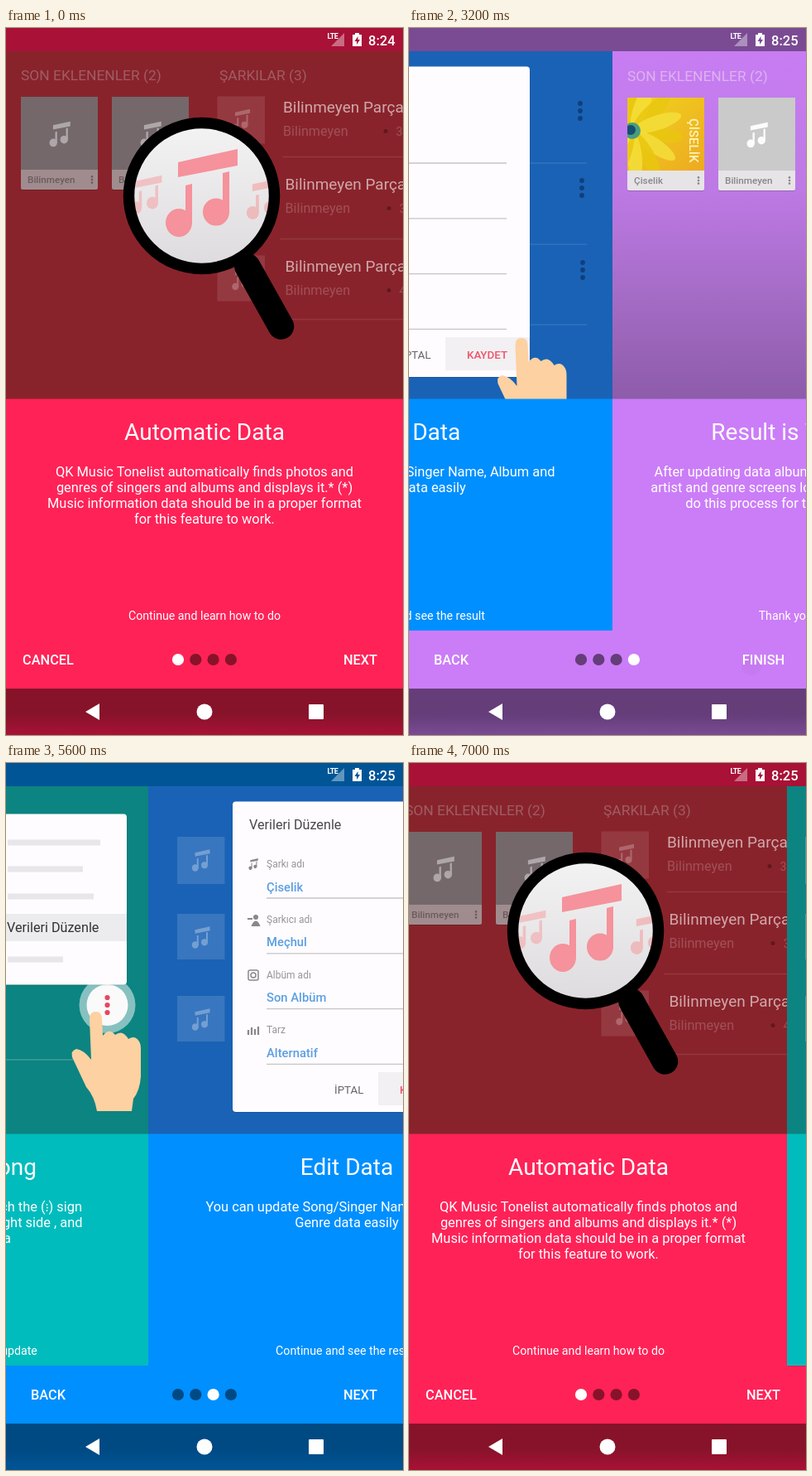
An HTML page for the animation above (7100 ms loop, 480 by 853 pixels).

```html
<!DOCTYPE html>
<html lang="en">
<head>
<meta charset="utf-8">
<title>Music app introduction</title>
<style>
html, body { margin: 0; width: 100%; height: 100%; overflow: hidden; background: #a91137; }
svg { display: block; }
text { font-family: Roboto, sans-serif; white-space: pre; }
</style>
</head>
<body>
<svg id="stage" width="100%" height="100%" viewBox="0 0 480 853"></svg>
<script>
const LOOP = 7100, STEP = 100, W = 480;

const themes = [
  { body: '#ff2257', image: '#89232b', status: '#a91137', nav: '#87132a' },
  { body: '#00bcbd', image: '#0c8481', status: '#006f6e', nav: '#005b5b' },
  { body: '#008fff', image: '#1a62b5', status: '#005597', nav: '#004a84' },
  { body: '#cb7df7', image: 'url(#dusk)', status: '#7a4b93', nav: '#643d79' }
];

// Drawing helpers
const rect = (x, y, w, h, fill, more = '') =>
  `<rect x="${x}" y="${y}" width="${w}" height="${h}" fill="${fill}" ${more}/>`;
const disc = (x, y, r, fill, more = '') =>
  `<circle cx="${x}" cy="${y}" r="${r}" fill="${fill}" ${more}/>`;
const text = (s, x, y, size, fill = '#fff', more = '') =>
  `<text x="${x}" y="${y}" font-size="${size}" fill="${fill}" ${more}>${s}</text>`;
const mid = (s, x, y, size, more = '') =>
  text(s, x, y, size, '#fff', 'text-anchor="middle" ' + more);
const rule = (x1, x2, y, color, more = '') =>
  `<path d="M${x1} ${y}H${x2}" stroke="${color}" stroke-width="1.3" ${more}/>`;
const group = (more, ...parts) => `<g ${more}>${parts.join('')}</g>`;
const note = (x, y, s, fill, op = 1) =>
  `<use href="#note" transform="translate(${x} ${y}) scale(${s})" fill="${fill}" opacity="${op}"/>`;
const dots = (x, y, gap, r, fill) =>
  [-gap, 0, gap].map(d => disc(x, y + d, r, fill)).join('');

const rowTops = [89, 182, 281];
const thumbs = (x, op, noteOp) => rowTops.map((y, i) => {
  const h = i ? 55 : 57;
  return rect(x, y, 57.5, h, '#fff', `opacity="${op}"`) + note(x + 28.5, y + 28.5, .25, '#fff', noteOp);
}).join('');

// The four values are opacities of white
function songList(title, sub, thumb, line) {
  const rows = [[101.5, 108, '3:45'], [104, 201, '3:45'], [104, 300, '4:13']];
  return thumbs(22, thumb, thumb * 2.3) + rows.map(([x, y, time], i) => {
    const end = i ? 242 : 238;
    return text('Bilinmeyen Parça', x, y, 19, '#fff', `opacity="${title}"`) +
      text('Bilinmeyen', x, y + 28.5, 16.2, '#fff', `opacity="${sub}"`) +
      disc(end - 12.5, y + 23, 2.5, '#000', 'opacity=".3"') +
      text(time, end, y + 28.5, 14.2, '#fff', `opacity="${sub}"`) +
      rule(i ? 98 : 101, 389, [162, 261, 358][i], '#fff', `opacity="${line}"`);
  }).join('');
}

function card(x, y, art, label, strip, ink) {
  return rect(x, y + 1.5, 93, 111.5, '#000', 'rx="2" opacity=".18"') +
    rect(x, y, 93, 112, strip, 'rx="2"') + art +
    text(label, x + 8, y + 104, 11.7, ink, 'font-weight="500"') +
    dots(x + 86, y + 100, 3.6, 1.3, ink);
}

function plainCard(x, y, gray, strip, ink, noteOp) {
  const art = rect(x, y, 93, 88, gray) + note(x + 47, y + 45, .29, '#fff', noteOp);
  return card(x, y, art, 'Bilinmeyen', strip, ink);
}

function page(i, title, lines, foot, picture) {
  return `<svg class="page" width="480" height="853">` +
    rect(0, 28, W, 420, themes[i].image) + picture +
    rect(0, 447.5, W, 279.5, themes[i].body) +
    mid(title, 240, 497, 28) +
    lines.map((s, n) => mid(s, 240, 541 + n * 19.1, 16.42)).join('') +
    mid(foot, 240, 713.5, 14.2) + (i === 1 ? disc(358, 536.4, 1, '#fff') : '') + '</svg>';
}

const hand = 'M409 309Q409 300 416.500 300Q424 300 424 309L425 329Q433 319 440 328' +
  'Q449 321 456 333Q464 328 469 336Q471 339 471 345V378Q470 395 462 405L460 420H418' +
  'Q415 402 405 391Q397 374 388 355Q386 347 393 345Q402 346 411 358Z';
const fingers = more => `<path d="${hand}" fill="#fdd1a1" ${more}/>`;

const lens =
  '<path d="M292 288L332.500 360" stroke="#000" stroke-width="31.500" stroke-linecap="round"/>' +
  disc(236.5, 202.5, 88, 'url(#glass)') +
  group('clip-path="url(#lensClip)"',
    note(169, 201, .44, '#f59a9c', .5), note(311, 206, .47, '#f59a9c', .55),
    note(236, 199, 1, '#f5929b')) +
  '<circle cx="236.500" cy="202.500" r="88" fill="none" stroke="#000" stroke-width="13.500"/>';

const searchPic =
  text('SON EKLENENLER (2)', 18, 63, 17.4, '#9f5c62') +
  text('ŞARKILAR (3)', 258, 63, 17.4, '#9f5c62') +
  plainCard(18, 83, '#74686b', '#a08c8e', '#6b5a5d', .42) +
  plainCard(128, 83, '#74686b', '#a08c8e', '#6b5a5d', .42) +
  group('transform="translate(233.5 -6.500)"', songList(.6, .2, .1, .09)) + lens;

const menuPic = songList(.78, .36, .22, .2) +
  disc(430.5, 292, 34, '#fff', 'opacity=".5"') + disc(430.5, 292, 25, '#fafafa') +
  dots(430.5, 292, 9, 3.1, '#e9465f') +
  rect(282.5, 62.5, 172, 206, '#000', 'rx="4" opacity=".1"') +
  rect(283, 61.5, 171, 206, '#fefcfe', 'rx="4"') +
  [[96, 112], [128, 91], [161, 104], [237, 67]].map(([y, w]) =>
    rect(310, y - 3.5, w, 7, '#e8e6e9')).join('') +
  rect(283, 182, 171, 33, '#ecebed') +
  text('Verileri Düzenle', 309, 204, 16.2, '#333') + fingers('');

const fields = [['Şarkı adı', 'Çiselik'], ['Şarkıcı adı', 'Meçhul'],
  ['Albüm adı', 'Son Albüm'], ['Tarz', 'Alternatif']];
const icons = [
  note(127, 122, .13, '#888'),
  disc(130, 186, 3, '#888') + '<path d="M120 188h6M126 196q4-9 8 0z" stroke="#888" stroke-width="2" fill="#888"/>',
  '<rect x="121" y="250" width="12" height="12" rx="2" fill="none" stroke="#888" stroke-width="1.500"/>' +
    '<circle cx="127" cy="256" r="3" fill="none" stroke="#888" stroke-width="1.500"/>',
  '<path d="M121 328v-6M125 328v-9M129 328v-7M133 328v-10" stroke="#888" stroke-width="2.200"/>'
];
const editPic = thumbs(35, .13, .3) +
  [163, 261, 358].map(y => rule(380, 449, y, '#fff', 'opacity=".1"')).join('') +
  [[441, 100], [443, 193], [444, 292]].map(([x, y]) => dots(x, y, 9, 2.9, '#0f3f7c')).join('') +
  rect(101.5, 47.5, 279, 374.5, '#000', 'rx="4" opacity=".1"') +
  rect(102, 46.5, 278, 374.5, '#fefcfe', 'rx="4"') +
  text('Verileri Düzenle', 122, 80, 16.2, '#484848') +
  fields.map(([label, value], i) => {
    const y = i * 66.8;
    return text(label, 143, 126 + y, 12, '#969696') +
      text(value, 143, 154.5 + y, 14.8, '#5b9fe2', 'font-weight="500"') +
      rule(143, 352, 163 + y, '#c6c4c6');
  }).join('') + icons.join('') +
  rect(278, 373, 102, 40, '#f2f0f2') +
  text('İPTAL', 225, 398.500, 13.4, '#666') +
  text('KAYDET', 304, 398.500, 13.4, '#f0556c', 'font-weight="500"') +
  fingers('transform="translate(-46.5 74)"');

const petals = Array.from({ length: 14 }, (_, i) =>
  `<ellipse cx="56" cy="124" rx="30" ry="9" transform="rotate(${i * 360 / 14 + 8} 24 124)" ` +
  `fill="${i % 2 ? '#f5df3a' : '#e9c70f'}" opacity=".85"/>`).join('');
const cover = group('clip-path="url(#coverClip)"',
  rect(18, 84, 93, 88, 'url(#gold)'), petals,
  disc(24, 124, 10, '#4a9c80'), disc(22, 123, 6, '#15506f'),
  text('ÇİSELİK', 92.5, 109, 15, '#fff3b8', 'font-weight="500" transform="rotate(90 92.5 109)"'));

const resultPic =
  text('SON EKLENENLER (2)', 18, 64, 17.4, '#dcb3f0') +
  text('ŞARKILAR (3)', 258, 64, 17.4, '#dcb3f0') +
  card(18, 84, cover, 'Çiselik', '#e6e4e6', '#8a868a') +
  plainCard(128, 84, '#cacaca', '#e6e4e6', '#8a868a', .95) +
  group('transform="translate(233.5 -5.500)"', songList(.8, .4, .2, .2));

const pages = [
  page(0, 'Automatic Data', ['QK Music Tonelist automatically finds photos and',
    'genres of singers and albums and displays it.* (*)',
    'Music information data should be in a proper format',
    'for this feature to work.'], 'Continue and learn how to do', searchPic),
  page(1, 'Choose the song', ['Swap to the songs tab and touch the (:) sign',
    'which located at every songs right side , and',
    'choose Update Data'], 'Continue and learn how to update', menuPic),
  page(2, 'Edit Data', ['You can update Song/Singer Name, Album and',
    'Genre data easily'], 'Continue and see the result', editPic),
  page(3, 'Result is Wonderful', ['After updating data albums, songs, singers, playlists',
    'artist and genre screens look as shown here. You can',
    'do this process for the rest of your songs.'], 'Thank you so much!', resultPic)
];

const stage = document.getElementById('stage');
stage.innerHTML = `<defs>
  <g id="note" stroke="none"><g transform="translate(-236 -199)">
    <path d="M208 162L280 146V166L208 180ZM217 190L225 188V236H217ZM262 175L270 173V223H262Z"/>
    <ellipse cx="209" cy="235" rx="16" ry="17"/><ellipse cx="254" cy="222" rx="16" ry="16.500"/>
  </g></g>
  <clipPath id="lensClip"><circle cx="236.500" cy="202.500" r="83"/></clipPath>
  <clipPath id="coverClip"><rect x="18" y="84" width="93" height="88"/></clipPath>
  <clipPath id="nextClip"><rect x="385" y="742" width="88" height="41" rx="3"/></clipPath>
  <linearGradient id="glass" x1="0" y1="0" x2="0" y2="1"><stop stop-color="#f4f3f4"/><stop offset="1" stop-color="#dddbdd"/></linearGradient>
  <linearGradient id="dusk" x1="0" y1="0" x2="0" y2="1"><stop stop-color="#c87df3"/><stop offset=".4" stop-color="#bd79e4"/><stop offset=".7" stop-color="#a56cc6"/><stop offset="1" stop-color="#8d5caa"/></linearGradient>
  <linearGradient id="gold" x1="0" y1="0" x2="1" y2="1"><stop stop-color="#f1d51c"/><stop offset="1" stop-color="#eda922"/></linearGradient>
  <linearGradient id="navFill" x1="0" y1="0" x2="0" y2="1"><stop id="navTop"/><stop id="navMid" offset=".55"/><stop id="navEnd" offset="1"/></linearGradient>
</defs>` +
  rect(0, 0, W, 853, '', 'id="bar"') +
  rect(0, 28, W, 769, '', 'id="base"') +
  rect(0, 797, W, 56, 'url(#navFill)') +
  pages.join('') +
  group('clip-path="url(#nextClip)"', disc(414, 769, 0, '#000', 'id="tap"')) +
  rect(45, 797, 120, 56, '#fff', 'id="press" rx="28"') +
  mid('', 51, 768, 16.33, 'id="left" font-weight="500"') +
  mid('', 428.500, 768, 16.33, 'id="right" font-weight="500"') +
  [0, 1, 2, 3].map(i => disc(208 + i * 21.3, 762, 7.1, '', 'class="dot"')).join('') +
  '<path d="M96 825L113 815V835Z" fill="#fff"/>' + disc(240, 825, 9.5, '#fff') +
  rect(366, 816, 18, 18, '#fff', 'rx="1"') +
  '<path d="M409 6V22H393Z" fill="#fff" opacity=".38"/>' +
  text('LTE', 388.5, 13, 9, '#fff', 'font-weight="700" letter-spacing="-.6"') +
  '<path d="M422 6h5v2h3v14h-11v-14h3z" fill="#fff"/>' +
  '<path id="bolt" d="M425.500 10L421.500 16H424V20L428 14H425.500Z"/>' +
  text('', 438, 20.500, 16.5, '#fff', 'id="clock" font-weight="500"');

const el = id => document.getElementById(id);
const pageEls = [...document.querySelectorAll('.page')];
const dotEls = [...document.querySelectorAll('.dot')];
const clamp = v => Math.max(0, Math.min(1, v));

// Quintic ease out over 200 ms
const glide = (t, start, from, to) =>
  to + (from - to) * Math.pow(1 - clamp((t - start) / 200), 5);
const drag = (t, start, end, from, dist) =>
  from - dist * Math.pow(clamp((t - start) / (end - start)), 1.518);

// Each move: when it begins, which page is then selected, and the scroll position
const moves = [
  [0, 0, () => 0],
  [1110, 1, t => glide(t, 1110, 0, 480)],
  [2230, 2, t => glide(t, 2230, 480, 960)],
  [3175, 3, t => glide(t, 3175, 960, 1440)],
  [4139, 2, t => glide(t, 4139, 1440, 960)],
  [5160, 2, t => drag(t, 5160, 5630, 960, 190)],
  [5630, 1, t => glide(t, 5630, 770, 480)],
  [6560, 1, t => drag(t, 6560, 6927, 480, 260)],
  [6927, 0, t => glide(t, 6927, 220, 0)]
];
const taps = [1110, 2230, 3175];

function draw(t) {
  const [, sel, scroll] = moves.filter(m => m[0] <= t).pop();
  const pos = scroll(t), c = themes[sel];
  pageEls.forEach((p, i) => p.setAttribute('x', Math.round(i * W - pos)));
  el('bar').setAttribute('fill', c.status);
  el('bolt').setAttribute('fill', c.status);
  el('base').setAttribute('fill', c.body);
  el('navTop').setAttribute('stop-color', c.nav);
  el('navMid').setAttribute('stop-color', c.nav);
  el('navEnd').setAttribute('stop-color', c.status);
  dotEls.forEach((d, i) => d.setAttribute('fill', i === sel ? '#fff' : c.nav));
  el('left').textContent = sel ? 'BACK' : 'CANCEL';
  el('right').textContent = sel === 3 ? 'FINISH' : 'NEXT';
  el('clock').textContent = t < 2800 ? '8:24' : '8:25';

  const age = t - (taps.filter(s => s <= t).pop() ?? -LOOP);
  el('tap').setAttribute('r', Math.min(100, 12 + Math.max(0, age - 25) * 1.3));
  el('tap').setAttribute('opacity', .09 * clamp(age / 80) * clamp((450 - age) / 350));
  const held = t >= 4100 ? clamp((4500 - t) / 250) : 0;
  el('press').setAttribute('opacity', .14 * held);
}

function tick() {
  const t = performance.now() % LOOP;
  draw(Math.floor(t / STEP) * STEP);
  requestAnimationFrame(tick);
}
tick();
</script>
</body>
</html>
```
